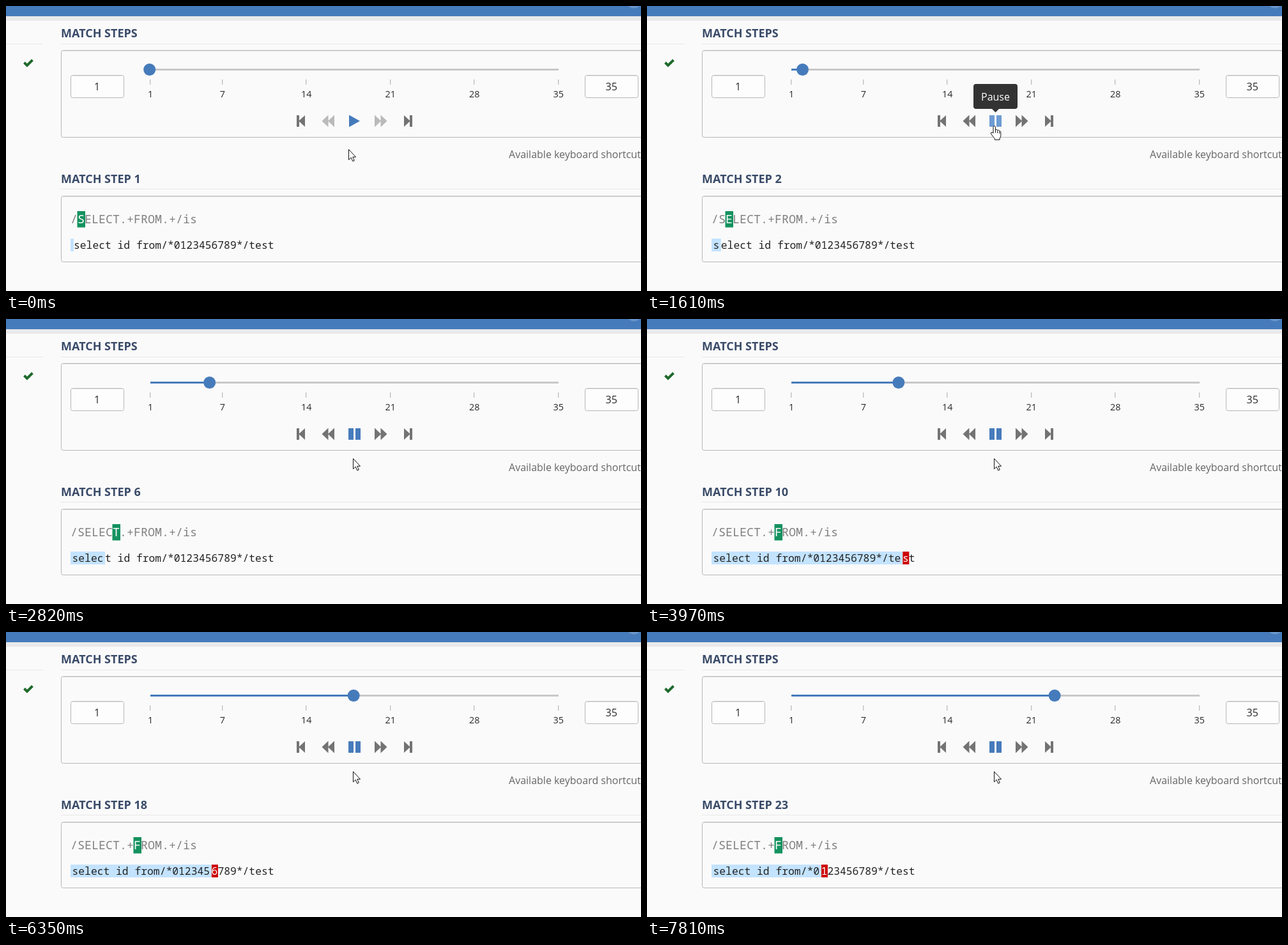
An HTML page for the animation above (8 s loop, 994 by 446 pixels).

```html
<!DOCTYPE html>
<html lang="en">
<head>
<meta charset="utf-8">
<title>Match steps</title>
<style>
  html, body { margin: 0; width: 100%; height: 100%; overflow: hidden; background: #fafafa; }
  svg { display: block; width: 994px; height: 446px; }
  text { font-family: "Open Sans", sans-serif; font-size: 16px; fill: #2b2b2b; white-space: pre; }
  .head { font-size: 18px; font-weight: 700; fill: #3a4b69; }
  .tick { font-size: 14.4px; }
  .mid { text-anchor: middle; }
  .regex, .subject { font-family: "Noto Sans Mono", monospace; }
  .regex { font-size: 18.33px; fill: #808080; }
  .subject { font-size: 16.33px; fill: #222; }
  .white { fill: #fff; }
  .box { fill: #fafafa; stroke: #b7b7b7; }
  .rule { fill: #e8e8e8; }
</style>
</head>
<body>
<svg id="stage" viewBox="0 0 994 446">
  <rect width="994" height="446" fill="#fafafa"/>
  <rect y="16" width="994" height="7" fill="#e9e9ec"/>
  <rect width="994" height="16" fill="#467bbb"/>
  <circle cx="983" cy="-9" r="12.5" fill="#6c97ca"/>

  <g class="rule">
    <rect y="59" width="58" height="1"/>
    <rect x="86" y="59" width="908" height="1"/>
    <rect x="86" y="286" width="908" height="1"/>
  </g>
  <path d="M28.5 88.5L33 93L41.5 84.5" fill="none" stroke="#1f6a2c" stroke-width="4"/>

  <text class="head" x="86" y="49">MATCH STEPS</text>
  <text class="head" x="86" y="277" id="title"></text>
  <text x="787" y="238" style="fill:#666">Available keyboard shortcuts</text>

  <rect class="box" x="86.5" y="69.5" width="930" height="136" rx="3"/>
  <rect class="box" x="86.5" y="297.5" width="930" height="103" rx="3"/>
  <path d="M88 70.5H994M88 298.5H994" stroke="#e3e3e3"/>

  <g id="inputs"></g>
  <g id="ticks"></g>
  <rect x="226" y="98" width="639" height="3" fill="#c8c8c8"/>
  <rect id="fill" x="226" y="98" height="3" fill="#467bbb"/>
  <circle id="knob" cy="99.5" r="9.5" fill="#467bbb"/>

  <path fill="#737373" d="M455 171h4v8.2l9-8.2v18l-9-8.2v8.2h-4z"/>
  <path fill="#737373" d="M636 171h-4v8.2l-9-8.2v18l9-8.2v8.2h4z"/>
  <g id="seek">
    <path d="M504.5 170.5v19L494.5 180zM514 170.5v19L504 180z"/>
    <path d="M577 170.5v19L587 180zM586.5 170.5v19L596.500 180z"/>
  </g>
  <path id="play" d="M537 170.500L554 180L537 189.500z"/>
  <path id="pause" d="M536 171h8v18h-8zM547 171h8v18h-8z"/>

  <rect id="token" y="321" height="25.500" fill="#14925f"/>
  <text class="regex" x="101" y="340" id="regex"></text>
  <text class="regex white" y="340" id="tokenText"></text>

  <rect id="match" x="101" y="364" height="20" fill="#c3e3ff"/>
  <rect id="back" y="364" width="10" height="20" fill="#cc0000"/>
  <text class="subject" x="103.5" y="380" id="matched"></text>
  <text class="subject white" y="380" id="backText"></text>
  <text class="subject" y="380" id="rest"></text>

  <g id="tip">
    <rect id="tipBox" y="122" height="39" rx="4" fill="#333"/>
    <path d="M539.500 160.500h12l-6 6z" fill="#333"/>
    <text class="mid white" x="545.5" y="147.500" id="tipText"></text>
  </g>

  <g id="cursor" fill="#fff" stroke="#111" stroke-linejoin="round">
    <path id="arrow" d="M0 0V16.200L3.700 12.700L6.300 18.500L8.800 17.400L6.300 11.800H11z"/>
    <g id="hand">
      <path d="M-1.500 11.500V2Q-1.500 .3 .2 .3T2 2V7Q2.300 5.800 3.700 5.900T5.200 7.400Q5.600 6.500 6.900 6.800T8.200 8.400Q10.300 8 10.300 10.200V15Q10.300 17.500 8.600 19.500V21.800H.8V20Q-1.500 17.500-4.500 13.200Q-5.800 11.300-4.600 10.500Q-3.300 9.700-1.500 11.500z"/>
      <path d="M2 7v4M5.200 8v3.500M8.200 9v3" fill="none"/>
    </g>
  </g>
</svg>
<script>
const LOOP = 8000;
const REGEX = "/SELECT.+FROM.+/is";
const SUBJECT = "select id from/*0123456789*/test";
const REGEX_W = 11, CHAR_W = 9.8, PAD = 2.5;
const BLUE = "#467bbb", BLUE_HOVER = "#6d9bd2";

// start time of step 2, step 3, ...
const STEP_AT = [1610, 1900, 2240, 2510, 2820, 3100, 3380, 3690, 3970, 4250, 4530,
  4840, 5140, 5420, 5820, 6070, 6350, 6630, 6940, 7220, 7530, 7810];
const TIP_AT = 1180, CLICK_AT = 1330, LEAVE_AT = 1730;

const $ = id => document.getElementById(id);
const set = (id, attrs) => {
  for (const key in attrs) $(id).setAttribute(key, attrs[key]);
};
const show = (id, on) => set(id, { visibility: on ? "visible" : "hidden" });
const write = (id, text, x) => {
  $(id).textContent = text;
  if (x !== undefined) set(id, { x });
};
const mix = (a, b, k) => a + (b - a) * k;
const clamp = (v, lo, hi) => Math.min(hi, Math.max(lo, v));

function buildStatic() {
  $("ticks").innerHTML = [1, 7, 14, 21, 28, 35].map(n => {
    const x = 226 + (n - 1) * 18.78;
    return `<rect x="${Math.round(x - 1)}" y="115" width="1.3" height="8" fill="#bcbcbc"/>` +
      `<text class="tick mid" x="${x + 0.2}" y="143">${n}</text>`;
  }).join("");
  $("inputs").innerHTML = [[101, 1], [906, 35]].map(([x, n]) =>
    `<rect class="box" x="${x + 0.5}" y="108.5" width="83" height="35" rx="3" style="fill:#fdfdfd"/>` +
    `<path d="M${x + 2} 109.500h80" stroke="#e6e6e6"/>` +
    `<text class="mid" x="${x + 41.7}" y="132">${n}</text>`).join("");
}

function cursorAt(t) {
  if (t < LEAVE_AT) {
    const k = clamp(Math.floor((t - 120) / 130) + 1, 0, 8) / 8;
    const e = k * k * (3 - 2 * k);
    return [mix(536.5, 543.5, e), mix(224.5, 187.5, e)];
  }
  return [543.5, t < 1900 ? 203.5 : t < 2060 ? 213.5 : 218.5];
}

function tokenOf(step) {
  if (step < 7) return [step, 1];
  return step === 7 ? [7, 2] : [9, 1];
}

function drawMatch(step) {
  const [at, len] = tokenOf(step);
  const tokenX = 101 + at * REGEX_W;
  write("regex", REGEX.slice(0, at) + " ".repeat(len) + REGEX.slice(at + len));
  write("tokenText", REGEX.slice(at, at + len), tokenX);
  set("token", { x: tokenX - 0.5, width: len * REGEX_W + 1.5 });

  // greedy match takes everything, then gives back one character per step
  const backing = step > 8;
  const count = step < 8 ? step - 1 : backing ? 40 - step : SUBJECT.length;
  const end = 101 + 2 * PAD + count * CHAR_W;
  set("match", { width: end - 101 });
  write("matched", SUBJECT.slice(0, count));
  show("back", backing);
  set("back", { x: end + 0.3 });
  write("backText", backing ? SUBJECT[count] : "", end);
  const from = count + (backing ? 1 : 0);
  write("rest", SUBJECT.slice(from), end + (from - count) * CHAR_W);
}

function draw(t) {
  const step = 1 + STEP_AT.filter(at => t >= at).length;
  const running = t >= CLICK_AT;
  const [x, y] = cursorAt(t);
  const hover = y < 191;

  write("title", "MATCH STEP " + step);
  const knobX = 224.7 + (step - 1) * 18.79;
  set("knob", { cx: knobX });
  set("fill", { width: Math.max(0, knobX - 226) });
  drawMatch(step);

  set("seek", { fill: running ? "#737373" : "#bababa" });
  const color = hover ? BLUE_HOVER : BLUE;
  set("play", { fill: color });
  set("pause", { fill: color });
  show("play", !running);
  show("pause", running);

  show("tip", t >= TIP_AT && t < LEAVE_AT);
  const tipW = running ? 69 : 55;
  set("tipBox", { x: 545.5 - tipW / 2, width: tipW });
  write("tipText", running ? "Pause" : "Play");

  set("cursor", { transform: `translate(${x} ${y})` });
  show("arrow", !hover);
  show("hand", hover);
}

buildStatic();
const start = performance.now();
function frame() {
  draw((performance.now() - start) % LOOP);
  requestAnimationFrame(frame);
}
frame();
</script>
</body>
</html>
```
